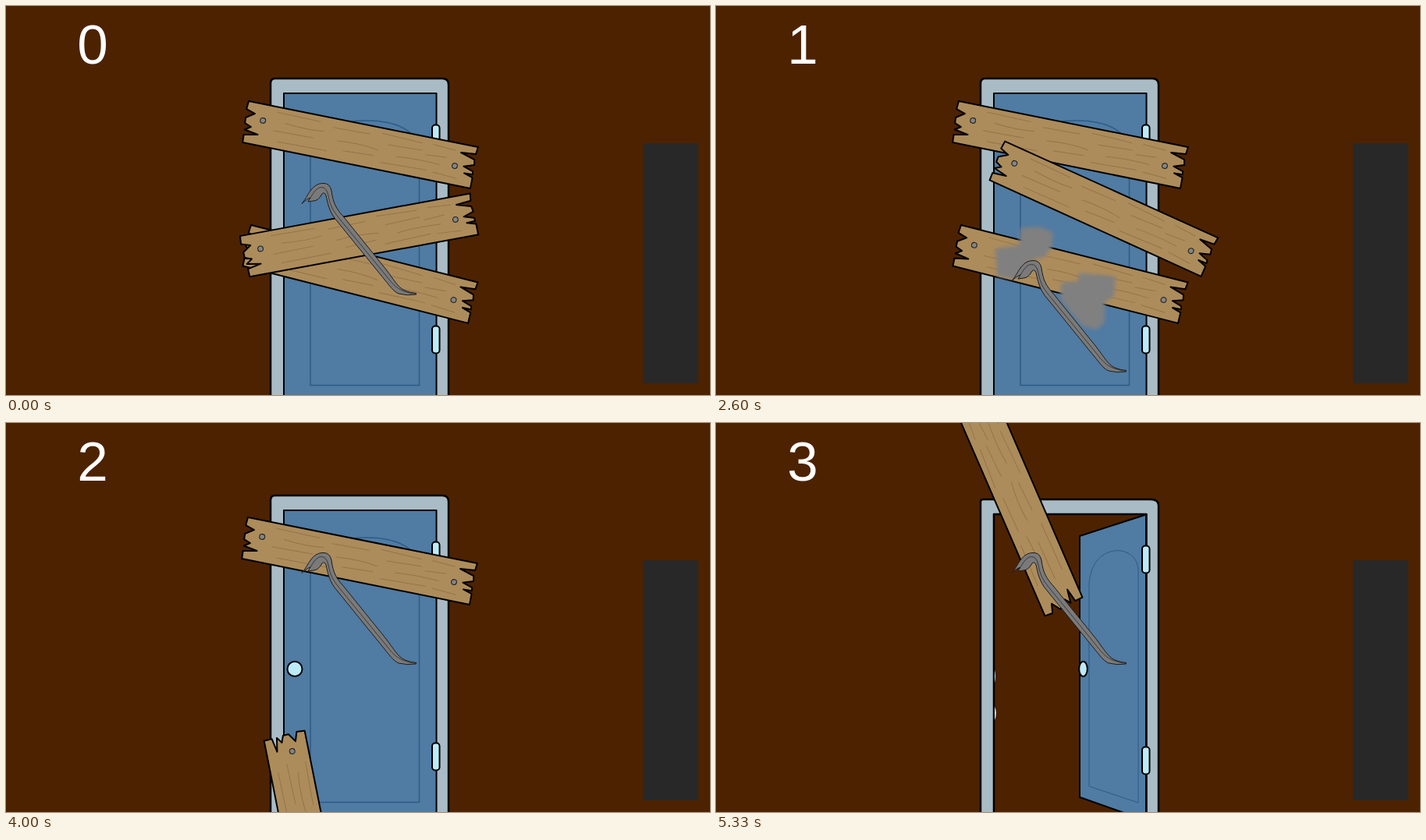
Write an HTML page that moves like this. It is 902x499 px and loops after 5.39 s.

```html
<!DOCTYPE html>
<html lang="en">
<head>
<meta charset="utf-8">
<title>Boarded door</title>
<style>
  html, body { margin: 0; width: 100%; height: 100%; overflow: hidden; background: #4d2200; }
  svg { display: block; width: 902px; height: 499px; }
  text { font: 71px "Liberation Sans", Arial, sans-serif; fill: #fff; text-anchor: middle; }
  .ink { stroke: #000; stroke-width: 2; stroke-linejoin: round; }
  .frame { fill: #a9bcc6; stroke-width: 2.5; }
  .leaf { fill: #507ba3; }
  .panel { fill: none; stroke: #2b5c86; stroke-width: 1.5; }
  .metal { fill: #bcebf8; }
  .wood { fill: #ad8c5b; }
  .grain { fill: none; stroke: #94744a; stroke-width: 1; }
  .nail { fill: #858585; stroke: #222; stroke-width: 1.1; }
  .bar { fill: #7a7a7a; stroke: #1c1c1c; stroke-width: 1; stroke-linejoin: round; }
  .crease { fill: none; stroke: #2a2a2a; stroke-width: .8; }
</style>
</head>
<body>
<svg viewBox="0 0 902 499">
  <defs>
    <filter id="soft" x="-20%" y="-20%" width="140%" height="140%"><feGaussianBlur stdDeviation="2.5"/></filter>
    <g id="plank">
      <path class="wood ink" d="M-150.700-26.800L149-26.900 148-17.500 129-15.700 147.500-10.200 148.800-3.400 135.700 1 148.400 4.900 149 9 138 9.500 149.500 13 149.700 27-148 26.700-148.500 16.500-131 13-148.700 10-141.400 4.900-150 1.600-150.300-5.500-139.800-12.700-151.500-16.500Z"/>
      <path class="grain" d="M-112-20L-55-19M-100-8Q-70-5-48-8M-113 4L-60 3M-105 17L-40 16M-38-15L10-16M-30 1Q0-2 24 2M-20 12L20 10M25-20L78-18M35-7L80-9M30 17L90 15M48 6Q70 3 105 5M92-19L122-17M85-4L112-6M98 16L130 18"/>
      <circle class="nail" cx="-128" cy="-6" r="3.4"/>
      <circle class="nail" cx="124.4" cy="2.6" r="3.4"/>
    </g>
    <rect id="hinge" class="metal ink" x="546" width="9.5" height="35" rx="4"/>
  </defs>

  <rect width="902" height="499" fill="#4d2200"/>
  <rect x="816" y="176" width="71" height="308" fill="#282828"/>
  <text id="count" x="111" y="74"></text>

  <g id="closed">
    <path class="frame ink" d="M339 510V99Q339 93 345 93H559Q567 93 567 101V510Z"/>
    <path class="leaf ink" d="M356 510V112H551.500V510Z"/>
    <path class="panel" d="M390 486.500V187C390 160 425 147 462 147S529.500 160 529.500 187V486.500Z"/>
    <use href="#hinge" y="152.500"/>
    <use href="#hinge" y="410.500"/>
    <circle class="metal ink" cx="370" cy="315.500" r="9.500"/>
  </g>
  <g id="open">
    <path class="frame ink" fill-rule="evenodd" d="M339 510V101Q339 98 342 98H557Q567 98 567 106V510H551.500V117H356V510Z"/>
    <path class="metal" d="M357 317Q359 325 357 333ZM357 364Q361 372 357 381Z"/>
    <path class="leaf ink" d="M466 145L551 117.500V510L466 480Z"/>
    <path class="panel" style="stroke-width:1" d="M478 466L541 487V190C541 152 478 152 478 210Z"/>
    <use href="#hinge" y="157.500"/>
    <use href="#hinge" y="415.500"/>
    <ellipse class="metal ink" cx="470.500" cy="315.500" rx="5.300" ry="9.500"/>
  </g>

  <g id="planks"></g>

  <g id="dust" fill="#808080" filter="url(#soft)">
    <path d="M390 285L414 283 432 290 430 311 419 323 402 326 396 345 378 350 360 347 358 311 388 307Z"/>
    <path d="M465 342L512 347 510 372 498 380 498 405 488 415 470 411 455 393 441 376 442 355 464 353Z"/>
  </g>

  <g id="crowbar">
    <path class="bar" d="M379 253.500C387 245 391 227 407 227.500Q415 227.500 417 237C419 253 423 260 433 271L487 338C497 351 502 361 511 365Q518 368 525.500 368.500V370Q514 372 503 369C496 366 491 358 485 351L425 277C414 265 412 252 410 243Q408 238 405 241Q400 250 394 250L387 251 390 246Q386 247 379 253.500Z"/>
    <path class="crease" d="M390 246C396 236 400 231 407 233Q412 235 414 248C417 260 421 265 429 275L487 346C496 357 501 366 525 369.500"/>
  </g>
</svg>
<script>
const LOOP = 5390, WAIT = 1400;
const $ = id => document.getElementById(id);

// vy, g, vx and spin are per tick; turn is the sudden tilt when a plank comes loose
const planks = [
  { x: 453.5, y: 178, angle: 11.35, start: 45.6, vx: -5.03, vy: -29.2, g: 1.736, spin: -9.2, turn: -1.5, shakeFrom: 38 },
  { x: 453.5, y: 344, angle: 14.2, start: 20.5, vx: -3.66, vy: -15.57, g: 1.437, spin: 3.57, turn: -1.5 },
  { x: 453, y: 294, angle: -10.5, start: 11.5, vx: 6.68, vy: -15.04, g: 1.517, spin: 5.157, turn: 1.4 }
];
for (const plank of planks) {
  plank.node = document.createElementNS("http://www.w3.org/2000/svg", "use");
  plank.node.setAttribute("href", "#plank");
  $("planks").append(plank.node);
}

// Fifteen ticks per second, on a clock of 10 ms; -1 while waiting
function tickAt(ms) {
  const t = ms - WAIT;
  if (t < 0) return -1;
  const rest = t % 200;
  return 3 * Math.floor(t / 200) + (rest >= 70) + (rest >= 130);
}

function crowbarY(k) {
  if (k < 0) return 0;
  if (k < 6) return k ? 23.5 : 15;
  if (k < 10) return 23.5 + 15.3 * (Math.min(k, 8) - 5);
  if (k < 28) return k === 10 ? 84.5 : 99;
  return Math.max(-61, 99 - 15.3 * (k - 27));
}

function placePlank(p, k) {
  const n = k - p.start;
  let { x, y, angle } = p;
  if (n > 0) {
    x += p.vx * n;
    y += p.vy * n + p.g * n * n;
    angle += p.turn + p.spin * n;
  } else if (k >= p.shakeFrom) {
    const shift = k % 2 ? -1 : 0;
    x += shift;
    y += shift;
  }
  p.node.setAttribute("transform", `translate(${x} ${y}) rotate(${angle})`);
}

const show = (id, on) => $(id).setAttribute("visibility", on ? "visible" : "hidden");

function draw(ms) {
  const k = tickAt(ms);
  $("count").textContent = [7, 26, 43].filter(at => k >= at).length;
  show("closed", k < 46);
  show("open", k >= 46);
  show("dust", k >= 16 && k < 20);
  planks.forEach(p => placePlank(p, k));
  $("crowbar").setAttribute("transform", `translate(0 ${crowbarY(k)})`);
}

const began = performance.now();
function loop() {
  draw((performance.now() - began) % LOOP);
  requestAnimationFrame(loop);
}
loop();
</script>
</body>
</html>
```
